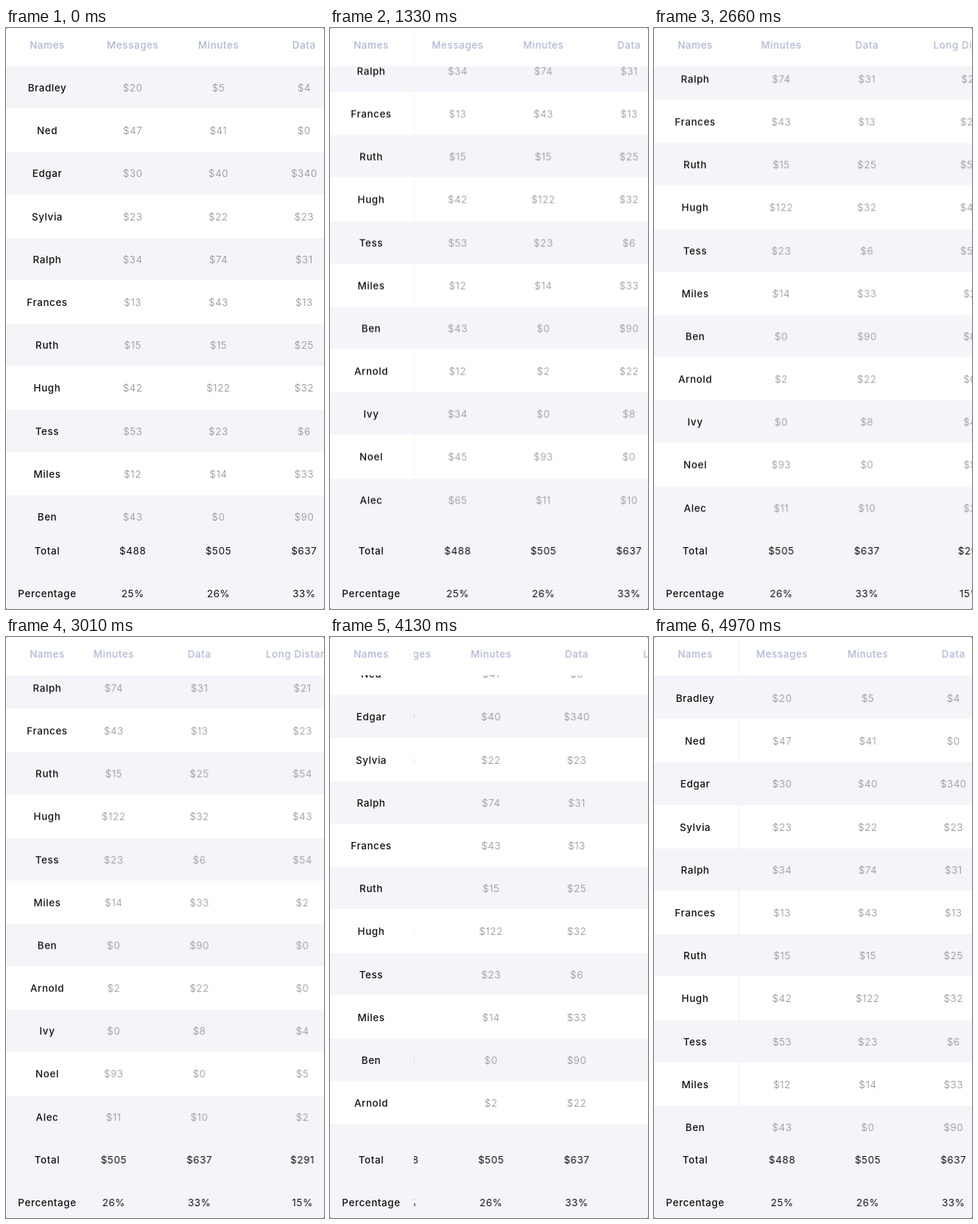
Animation of 432 by 788 pixels, one loop 5.04 s. Source, as an HTML page:

```html
<!DOCTYPE html>
<html lang="en">
<head>
<meta charset="utf-8">
<title>Usage table</title>
<style>
  :root { --tint: #f5f4f9; --row: 58.2px; --loop: 5040ms; }
  html, body { margin: 0; width: 100%; height: 100%; overflow: hidden; background: #555; }
  #stage {
    position: absolute; left: 0; top: 0; width: 432px; height: 788px;
    overflow: hidden; border-radius: 3px; background: var(--tint);
    font: 400 13.4px/58.2px Inter, "Open Sans", sans-serif; letter-spacing: .6px; color: #111;
  }
  .pane { position: absolute; left: 0; width: 432px; overflow: hidden; background: var(--tint); }
  #head { top: 0; height: 52px; color: #b0b7da; font-weight: 500; }
  #body { top: 52px; height: 628px; color: #8c8c90; font-weight: 300; }
  #foot { top: 680px; height: 108px; }
  #head .scroll { margin-top: -6.4px; }

  .scroll { position: relative; }
  .names, .cols { position: absolute; top: 0; }
  .names { left: 0; width: 114px; z-index: 1; font-weight: 500; }
  .cols { left: 114px; width: 512.8px; animation: slide var(--loop) infinite; }
  #body .scroll { animation: roll var(--loop) infinite; }
  #body .names { color: #111; }

  .row { display: flex; height: var(--row); background: var(--tint); white-space: nowrap; }
  #head .row, #body .row:nth-child(even) { background: #fff; }
  #body .row:nth-child(odd):not(:last-child) { box-shadow: inset 0 -1px #fff; }
  .row span { flex: none; width: 116.4px; text-align: center; }
  .cols span:last-child { width: 163.6px; }
  .names span { width: 112px; }

  @keyframes slide {
    0%, 11.905% { transform: translateX(0); animation-timing-function: linear; }
    15.278% { transform: translateX(.8px); animation-timing-function: linear; }
    26.389% { transform: translateX(1.3px); animation-timing-function: ease-out; }
    33.73%, 34.72% { transform: translateX(0); animation-timing-function: cubic-bezier(.35, .1, .4, 1); }
    47.62%, 56.94% { transform: translateX(-115.7px); animation-timing-function: cubic-bezier(.35, .1, .4, 1); }
    66.3%, 67.2% { transform: translateX(-194.6px); animation-timing-function: linear; }
    68.056% { transform: translateX(-193.4px); animation-timing-function: cubic-bezier(.45, .05, .6, .9); }
    88.889% { transform: translateX(-20.3px); animation-timing-function: cubic-bezier(.2, .6, .5, 1); }
    98.611% { transform: translateX(1.8px); animation-timing-function: step-end; }
    100% { transform: translateX(0); }
  }
  @keyframes roll {
    0%, 11.905% { transform: translateY(0); animation-timing-function: cubic-bezier(.5, 0, .8, .7); }
    15.278% { transform: translateY(-24.3px); animation-timing-function: cubic-bezier(.3, .25, .6, 1); }
    26.389% { transform: translateY(-255.6px); animation-timing-function: ease-in-out; }
    33.73%, 67.2% { transform: translateY(-244.8px); animation-timing-function: linear; }
    68.056% { transform: translateY(-244.3px); animation-timing-function: cubic-bezier(.45, .05, .6, .9); }
    88.889% { transform: translateY(-26.9px); animation-timing-function: cubic-bezier(.2, .6, .5, 1); }
    98.611% { transform: translateY(2px); animation-timing-function: step-end; }
    100% { transform: translateY(0); }
  }
</style>
</head>
<body>
<div id="stage">
  <div id="head" class="pane"></div>
  <div id="body" class="pane"></div>
  <div id="foot" class="pane"></div>
</div>
<script>
  const people = [
    ["Bradley", 20, 5, 4, 12],
    ["Ned", 47, 41, 0, 30],
    ["Edgar", 30, 40, 340, 21],
    ["Sylvia", 23, 22, 23, 20],
    ["Ralph", 34, 74, 31, 21],
    ["Frances", 13, 43, 13, 23],
    ["Ruth", 15, 15, 25, 54],
    ["Hugh", 42, 122, 32, 43],
    ["Tess", 53, 23, 6, 54],
    ["Miles", 12, 14, 33, 2],
    ["Ben", 43, 0, 90, 0],
    ["Arnold", 12, 2, 22, 0],
    ["Ivy", 34, 0, 8, 4],
    ["Noel", 45, 93, 0, 5],
    ["Alec", 65, 11, 10, 2]
  ];
  const totals = [1, 2, 3, 4].map(c => people.reduce((sum, p) => sum + p[c], 0));
  const all = totals.reduce((a, b) => a + b);
  const dollars = list => list.map(n => "$" + n);

  const row = cells => `<div class="row">${cells.map(c => `<span>${c}</span>`).join("")}</div>`;
  const fill = (id, rows) => {
    const names = rows.map(r => row(r.slice(0, 1))).join("");
    const cols = rows.map(r => row(r.slice(1))).join("");
    document.getElementById(id).innerHTML =
      `<div class="scroll"><div class="names">${names}</div><div class="cols">${cols}</div></div>`;
  };

  fill("head", [["Names", "Messages", "Minutes", "Data", "Long Distance"]]);
  fill("body", people.map(([name, ...costs]) => [name, ...dollars(costs)]));
  fill("foot", [
    ["Total", ...dollars(totals)],
    ["Percentage", ...totals.map(n => Math.round(n / all * 100) + "%")]
  ]);
</script>
</body>
</html>
```
